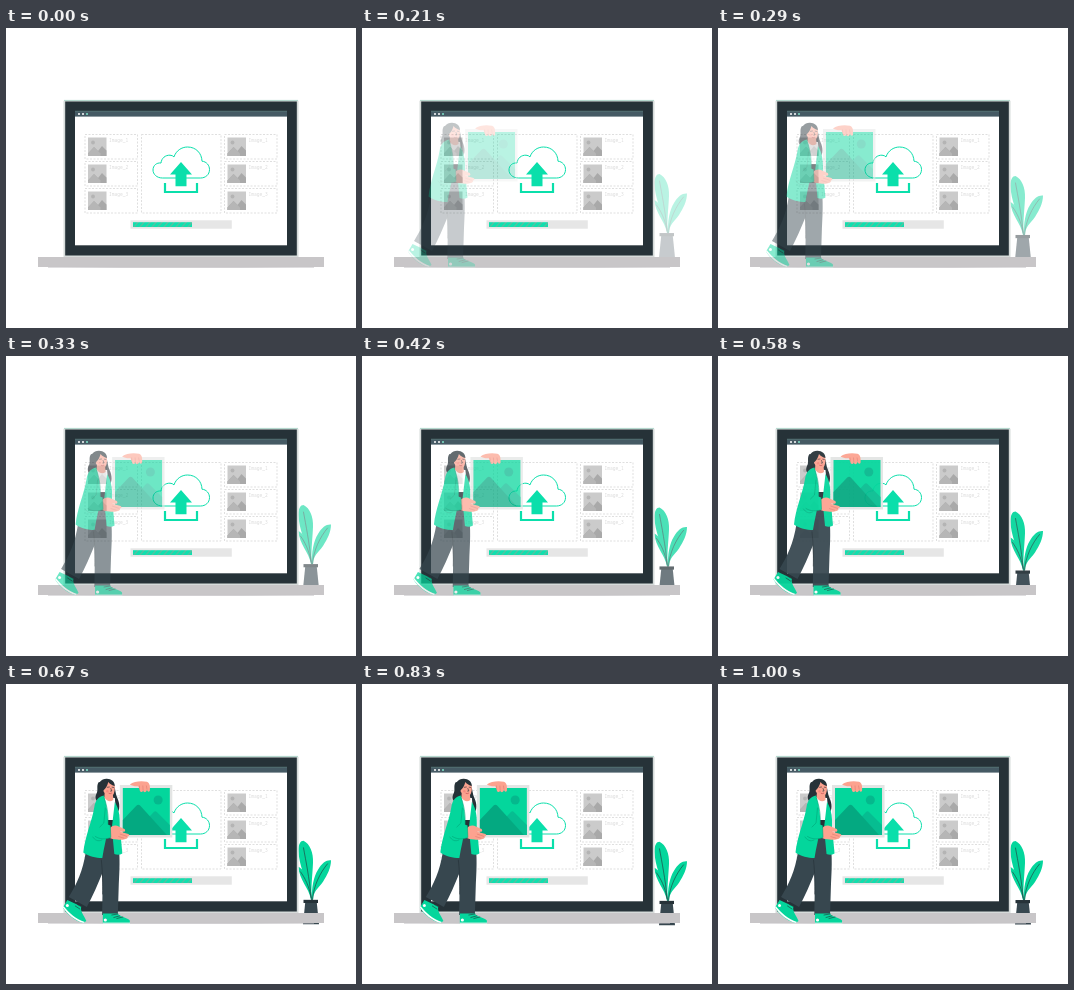
Write an HTML page that moves like this. It is 350 by 300 pixels and loops after 1040 ms.

```html
<!DOCTYPE html>
<html lang="en">
<head>
<meta charset="utf-8">
<title>Image upload</title>
<style>
  html, body { margin: 0; width: 100%; height: 100%; overflow: hidden; background: #fff; }
  svg { display: block; width: 350px; height: 300px; }
  .label { font: 4.6px "Noto Sans Mono", "DejaVu Sans Mono", monospace; fill: #dadada; }
  .dash { fill: none; stroke: #d2d2d2; stroke-width: .7; stroke-dasharray: 2 1.5; }
  .green { fill: #04d69c; }
  .dark { fill: #37474f; }
  .ink { fill: #263238; }
  .skin { fill: #fca28f; }
  .line { fill: none; stroke: #263238; stroke-width: .6; stroke-linecap: round; }
  .fold { fill: none; stroke: #03a67a; stroke-width: .6; stroke-linecap: round; }
</style>
</head>
<body>
<svg viewBox="0 0 350 300">
  <defs>
    <pattern id="stripes" width="6" height="6" patternUnits="userSpaceOnUse" patternTransform="skewX(-40)">
      <rect width="6" height="6" fill="#10dfae"/>
      <rect width="2" height="6" fill="#4fc3a1"/>
    </pattern>
    <g id="thumb">
      <rect class="dash" width="52.5" height="24.5"/>
      <rect x="3" y="3" width="18.5" height="18.5" fill="#cbcbcb"/>
      <circle cx="8" cy="8" r="1.9" fill="#b4b4b4"/>
      <path d="M3 19 9 12.5 13 16.5 17 11.5 21.500 16V21.500H3Z" fill="#a9a9a9"/>
      <path d="M3 19 9 12.500 15.500 19V21.500H3Z" fill="#b6b6b6"/>
    </g>
  </defs>

  <g id="plant" opacity="0">
    <path class="green" d="M305 216C303 204 293 196 292.500 183C299 187 304.500 196 306 216Z"/>
    <path class="green" d="M304.500 212C299 192 293 182 292.500 167C292.500 160 294.500 157 297.500 157C304 160 307.500 169 307 179C306.500 191 305 202 305.500 216Z"/>
    <path class="green" d="M306 216C305.500 204 307.500 193 312 186C316 179 320.500 176 325 176.500C325 184 321.500 191 317 198C312 205 307.500 207 307 216Z"/>
    <path class="line" d="M305.500 216C303 192 300 178 297.500 164M306.500 216C307.500 202 314 189 321.500 180M305.200 214C303 202 299 194 294.500 188"/>
    <path class="dark" d="M299.300 218H310.700L313 240.500H297Z"/>
    <rect class="ink" x="297.500" y="216" width="14.500" height="3.200"/>
  </g>

  <g id="laptop">
    <rect x="57.500" y="72" width="235" height="158" rx="1.500" fill="#d6dbda"/>
    <path d="M58 72.400H292" stroke="#a9d8ca" stroke-width=".8"/>
    <rect class="ink" x="59.200" y="73.500" width="231.600" height="154"/>
    <rect x="69" y="83" width="212" height="134.300" fill="#fff"/>
    <rect x="69" y="83" width="212" height="5.600" fill="#455a64"/>
    <path d="M69 83.200H281" stroke="#5f837f" stroke-width=".6"/>
    <circle cx="73" cy="86" r="1" fill="#fff"/>
    <circle cx="77" cy="86" r="1" fill="#fff"/>
    <circle cx="81" cy="86" r="1" fill="#7fe3c8"/>
    <path d="M32 229H318V239H296Q175 240.200 54 239H32Z" fill="#c8c6c8"/>
    <path d="M42 239.300H308" stroke="#bdbbbe" stroke-width=".6"/>

    <g id="thumbs"></g>
    <rect class="dash" x="135.500" y="106.500" width="79.500" height="78.500"/>

    <path d="M156.500 150C150.500 150 147 146 147 142C147 137.500 150.500 134.500 155 135C155.500 130 159.500 127 164 127.200C165.800 127.300 167 127.900 168 128.900C170 122.800 175.500 119 181.500 119C190 119 195.800 125.300 196 133.200C200.500 133.600 203.500 137.300 203.500 141.600C203.500 146.600 199.500 150 194.500 150Z" fill="#fff" stroke="#0adfab"/>
    <path d="M175 134 186 146.500H180.500V158.300H169.500V146.500H164Z" fill="#0adfab"/>
    <path d="M159 155V164H191V155" fill="none" stroke="#0adfab" stroke-width="2.200"/>

    <rect x="124.500" y="192.300" width="101.300" height="8.400" fill="#e6e6e6"/>
    <rect x="127" y="194.200" width="59" height="4.800" fill="url(#stripes)"/>
  </g>

  <g id="woman" opacity="0">
    <!-- legs and shoes -->
    <path class="dark" d="M80 168H103L97 188C92 200 87 212 81 223L63 213C71 200 77 187 80 168Z"/>
    <path class="green" d="M61.500 216 75.500 222.500C74 227 78 231 80.500 237L77.500 239C69 237 61 230 57 223.500Z"/>
    <path d="M57 223.500C62 230.500 69 236.500 77.500 239L79 238C70 235 63 229 57.700 222Z" fill="#fff"/>
    <path class="line" d="M69.500 222 74 225M71.500 220.500 76 223"/>
    <circle cx="61.500" cy="221.500" r="1.500" fill="#fff"/>
    <path class="dark" d="M95 150H111C114.500 166 114 182 113 199L112 231H96.300C96.800 213 97 200 95.500 180Z"/>
    <path class="line" d="M95.500 176C97 190 97 200 96.800 210"/>
    <path class="green" d="M97 229.500H112C114 233 122 233.500 124 236.500V239.500H97Z"/>
    <path d="M97 238.600H124.200V239.800H97Z" fill="#e7f3ef"/>
    <path class="line" d="M106 231 112 230M108 233.500 114 231.800M111 234.500 117 233" stroke-width="1"/>
    <circle cx="99.500" cy="236" r="1.600" fill="#fff"/>

    <!-- hair behind and torso -->
    <path class="ink" d="M93 98C90 102 93 106 90.500 110C89 113 89.500 117 93 118L104 122 110 130C115 127 114 119 111.500 114C109.500 110 110 106 108 101Z"/>
    <path d="M98 113 109 114 111 136 100 137Z" fill="#fff"/>
    <path class="skin" d="M99 107 107 109 107.500 116C104 118.500 101 117 98.500 113.500Z"/>
    <path class="ink" d="M101 136H110.500L111 151H100Z"/>
    <path class="green" d="M109 118C113 124 114.500 133 114 142L116.500 169.500C114 171 111 171 108.500 170L106 144Z"/>
    <path class="green" d="M98 111.500C93 112.500 89.500 116 88.500 123C86 138 79 153 77.500 168.500C83 172.500 90 174 96.500 174C98 164 101 153 102 144C103 134 101 121 98 111.500Z"/>
    <path class="fold" d="M98 113C101.500 122 103 132 102 143M96 156C92 158 89 156 87 153"/>

    <!-- head -->
    <path class="skin" d="M97.500 98C101 96 106.500 97 108.300 100.500C109.500 104 109 109 106.700 111.500C103.500 113.500 99.500 111 97.500 107Z"/>
    <path class="ink" d="M92.500 106C91.500 99 95.500 94.500 101 94.700C105.500 94.800 109 97.500 109 102C106.500 101.500 104 100 102.500 98C101.500 102 99.500 105 97.500 106.500C97 109 95 111 92 111Z"/>
    <path class="line" d="M101.500 103.300 103.500 103M106.300 103.200 107.800 103.500M105 104.500 106 107 104.800 107.100"/>
    <path d="M102.800 109.200Q104.500 110.200 106 109" fill="none" stroke="#c94f55" stroke-width=".7"/>
    <circle cx="101.500" cy="107.200" r="1.200" fill="#f57f77" opacity=".7"/>

    <!-- picture -->
    <rect x="114" y="101" width="52.500" height="52.500" fill="#e3e5e4"/>
    <rect class="green" x="117" y="104" width="47" height="47"/>
    <circle cx="152.300" cy="116" r="4.500" fill="#05b88d"/>
    <path d="M134 143 148 128Q149.500 126.700 151 128L164 141V151H134Z" fill="#06bd91"/>
    <path d="M117 136 130.500 121.700Q132.500 120 134.500 121.700L161 151H117Z" fill="#04a981"/>

    <!-- hands and near arm -->
    <path class="skin" d="M124 100.500C128 97.500 135 96.500 141 97.800C144 98.500 144.500 103 144 107C142.800 108.500 141.300 107.500 141.200 105.500C140.500 108.700 138 109 137.300 106.500C136.300 108.800 134 108.500 133.800 105.500L132.500 102.200C129.500 102.500 126.500 102 124 100.500Z"/>
    <path d="M133.800 105.500 133.500 101.500M137.300 106.500 137 101.500M141.200 105.500 140.500 101.500" fill="none" stroke="#d9746a" stroke-width=".5"/>
    <path class="skin" d="M102 146C106 141.500 109.500 140.500 113 142.500L117.500 144.500C119.500 145 120 147 118.500 147.700L113.500 147.500L122.500 150C124 151 123.500 152.600 121.500 152.500L122 153.800C120 155.700 115 156.200 111.500 155.500C108 155.500 105 154.500 103 153.200Z"/>
    <path d="M114 150 121.500 152.500M112.500 152.500 118.500 154.300" fill="none" stroke="#d9746a" stroke-width=".5"/>
    <path class="green" d="M91 117C96 115 100 120 99.500 127L98 139 104.500 141.500 105 153.500C100 155.500 94 155.500 89.500 152.500C85.500 149.500 86 143 87.500 136Z"/>
    <path class="fold" d="M99.500 124 98 139 94 143M104.500 142 105 153.500C100 155.500 94 155.500 89.500 152.500"/>
  </g>
</svg>
<script>
  const LOOP = 1040, STEP = LOOP / 25, TRAVEL = 13;
  const fades = [[80, .05], [125, .1], [210, .28], [330, .57], [500, .86], [650, 1]];
  const woman = document.getElementById('woman');
  const plant = document.getElementById('plant');

  document.getElementById('thumbs').innerHTML = [79, 218.5].map(x =>
    [1, 2, 3].map(n => {
      const y = 79.5 + n * 27;
      return `<use href="#thumb" x="${x}" y="${y}"/>` +
        `<text class="label" x="${x + 24}" y="${y + 7}">Image_${n}</text>`;
    }).join('')).join('');

  const bezier = (a, b, s) => 3 * (1 - s) ** 2 * s * a + 3 * (1 - s) * s * s * b + s ** 3;

  // cubic-bezier(.36, -.01, .5, 1.38): settles with a small overshoot
  function ease(x) {
    let lo = 0, hi = 1;
    for (let i = 0; i < 24; i++) {
      const mid = (lo + hi) / 2;
      if (bezier(.36, .5, mid) < x) lo = mid; else hi = mid;
    }
    return bezier(-.01, 1.38, lo);
  }

  function fade(t) {
    if (t < 80) return 0;
    const i = fades.findIndex(([at]) => at > t);
    if (i < 0) return 1;
    const [t0, a] = fades[i - 1], [t1, b] = fades[i];
    return a + (b - a) * (t - t0) / (t1 - t0);
  }

  function draw() {
    const now = performance.now() % LOOP;
    const t = Math.floor((now + 4) / STEP) % 25 * STEP;
    const shift = TRAVEL * (ease(Math.min(t / 1000, 1)) - 1);
    const alpha = fade(t);
    woman.setAttribute('transform', `translate(${shift.toFixed(2)} 0)`);
    plant.setAttribute('transform', `translate(0 ${shift.toFixed(2)})`);
    woman.setAttribute('opacity', alpha);
    plant.setAttribute('opacity', alpha);
    requestAnimationFrame(draw);
  }
  draw();
</script>
</body>
</html>
```
